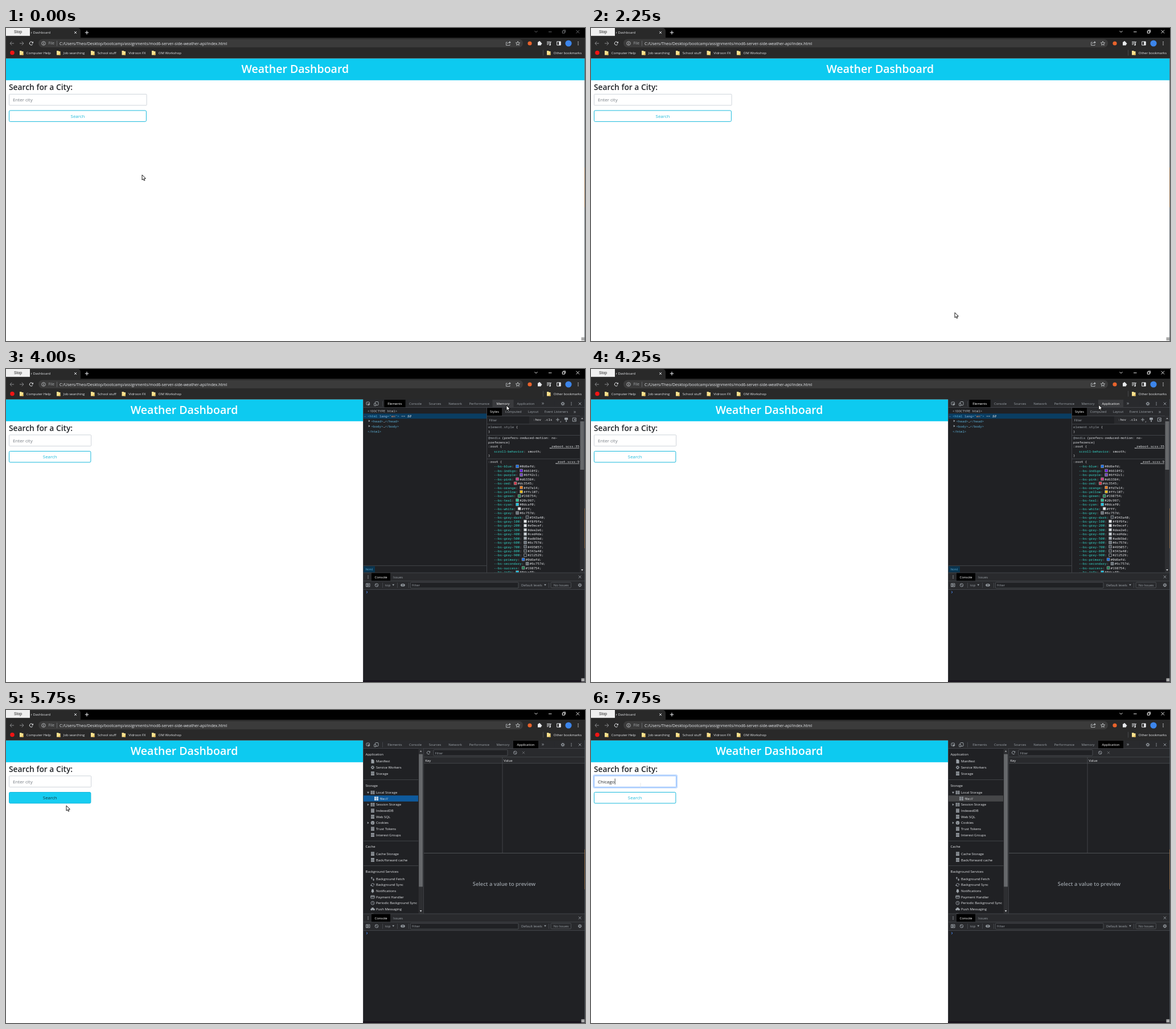
These frames come from a looping animation (1017 px wide and 550 px high, 8 s). An HTML page with a canvas:

```html
<!DOCTYPE html>
<html lang="en">
<head>
<meta charset="utf-8">
<title>Weather Dashboard</title>
<style>
html, body { margin: 0; width: 100%; height: 100%; overflow: hidden; background: #fff; }
canvas { display: block; width: 1017px; height: 550px; }
</style>
</head>
<body>
<canvas id="stage"></canvas>
<script>
const W = 1017, H = 550, LOOP = 8000, TICK = 250;
const SANS = '"Open Sans", "Noto Sans", sans-serif';
const MONO = '"Noto Sans Mono", "DejaVu Sans Mono", monospace';
const CH = 3.48;
const WHITE = '#e8eaed', GRAY = '#9aa0a6', PANEL = '#202124', BAR = '#292a2d', RULE = '#494c50', CYAN = '#0dcaf0';

const canvas = document.getElementById('stage');
const ctx = canvas.getContext('2d');
const dpr = window.devicePixelRatio || 1;
canvas.width = W * dpr;
canvas.height = H * dpr;
ctx.scale(dpr, dpr);

// ---------- drawing helpers ----------
function rect(x, y, w, h, c) {
  ctx.fillStyle = c;
  ctx.fillRect(x, y, w, h);
}
function frame(x, y, w, h, c, r = 0, fill) {
  ctx.beginPath();
  ctx.roundRect(x, y, w, h, r);
  if (fill) { ctx.fillStyle = fill; ctx.fill(); }
  ctx.strokeStyle = c;
  ctx.lineWidth = 1;
  ctx.stroke();
}
function line(c, w, ...p) {
  ctx.beginPath();
  for (let i = 0; i < p.length; i += 2) ctx.lineTo(p[i], p[i + 1]);
  ctx.strokeStyle = c;
  ctx.lineWidth = w;
  ctx.stroke();
}
function poly(c, ...p) {
  ctx.beginPath();
  for (let i = 0; i < p.length; i += 2) ctx.lineTo(p[i], p[i + 1]);
  ctx.closePath();
  ctx.fillStyle = c;
  ctx.fill();
}
function disc(x, y, r, c) {
  ctx.beginPath();
  ctx.arc(x, y, r, 0, 7);
  ctx.fillStyle = c;
  ctx.fill();
}
function arc(x, y, r, c, w = 0.9, a = 0, b = 2 * Math.PI) {
  ctx.beginPath();
  ctx.arc(x, y, r, a, b);
  ctx.strokeStyle = c;
  ctx.lineWidth = w;
  ctx.stroke();
}
// y is the middle of the capitals
function text(s, x, y, size = 6, c = WHITE, align = 'left', weight = 400, face = SANS) {
  ctx.font = `${weight} ${size}px ${face}`;
  ctx.textAlign = align;
  ctx.fillStyle = c;
  ctx.fillText(s, x, y + size * 0.36);
}
function code(x, y, ...parts) {
  for (let i = 0; i < parts.length; i += 2) {
    text(parts[i], x, y, 5.8, parts[i + 1], 'left', 400, MONO);
    x += parts[i].length * CH;
  }
}
function cross(x, y, r, c, w = 0.9) {
  line(c, w, x - r, y - r, x + r, y + r);
  line(c, w, x + r, y - r, x - r, y + r);
}
function dots(x, y, c, gap = 2.4) {
  for (let i = -1; i < 2; i++) disc(x, y + i * gap, 0.75, c);
}
function reload(x, y, r, c) {
  arc(x, y, r, c, 1, 0.5, 5.6);
  poly(c, x + r + 0.5, y - r - 0.5, x + r + 0.5, y - 0.3, x + 0.6, y - 0.3);
}
function gear(x, y, r, c) {
  arc(x, y, r * 0.62, c, 1.3);
  for (let i = 0; i < 8; i++) {
    const a = i * Math.PI / 4, u = Math.cos(a), v = Math.sin(a);
    line(c, 1, x + u * r * 0.7, y + v * r * 0.7, x + u * r * 1.15, y + v * r * 1.15);
  }
}
function noEntry(x, y, c) {
  arc(x, y, 2.8, c);
  line(c, 0.9, x - 2, y - 2, x + 2, y + 2);
}
function triDown(x, y, c, r = 1.8) { poly(c, x - r, y - r * 0.6, x + r, y - r * 0.6, x, y + r); }
function triUp(x, y, c) { poly(c, x - 1.8, y + 1, x + 1.8, y + 1, x, y - 1.4); }
function triRight(x, y, c) { poly(c, x - 1.2, y - 2, x + 1.6, y, x - 1.2, y + 2); }

// ---------- browser chrome ----------
function folder(x) {
  poly('#fbe08d', x, 40, x + 3, 40, x + 4, 41, x + 6.5, 41, x + 6.5, 47.5, x, 47.5);
  rect(x + 4.2, 45.2, 2.3, 2.3, '#e3b94c');
}
function browser(active) {
  rect(0, 0, W, 18, '#000');
  rect(0, 17, W, 36.5, '#292929');
  ctx.beginPath();
  ctx.roundRect(-6, 0, 137, 19, [0, 5, 0, 0]);
  ctx.fillStyle = '#292929';
  ctx.fill();
  text('r Dashboard', 78.3, 8, 6, '#dfe1e4', 'right');
  cross(122, 8, 2, WHITE);
  line(WHITE, 1.1, 138.8, 8, 145.2, 8);
  line(WHITE, 1.1, 142, 4.8, 142, 11.2);
  rect(0, 0, 42, 14, '#f0f0f0');
  rect(0, 13, 42, 1, '#c9c9c9');
  text('Stop', 21, 6.8, 6.8, '#222', 'center', 400, '"Liberation Sans", sans-serif');

  const c = active ? '#fff' : '#77797c';
  line(c, 0.9, 928.5, 5, 931, 7.6, 933.5, 5);
  line(c, 0.9, 953, 6.8, 958.5, 6.8);
  frame(977.3, 5, 4, 4, c);
  line(c, 0.8, 978.7, 3.6, 982.7, 3.6, 982.7, 7.6);
  cross(1004.3, 6.5, 2.8, c);

  for (const [x, d] of [[10.5, -1], [27.5, 1]]) {
    line('#8a8b8d', 1, x - 3.5, 27, x + 3.5, 27);
    line('#8a8b8d', 1, x + d * 0.3, 23.7, x + d * 3.5, 27, x + d * 0.3, 30.3);
  }
  reload(44.3, 27, 3, WHITE);
  ctx.beginPath();
  ctx.roundRect(57, 19.5, 851, 14.5, 7.2);
  ctx.fillStyle = '#3b3b3b';
  ctx.fill();
  arc(66, 27, 3.3, '#c4c7ca', 0.8);
  rect(65.5, 26.4, 1, 2.7, '#c4c7ca');
  rect(65.5, 24.8, 1, 1, '#c4c7ca');
  text('File', 74.5, 27, 6.6, '#a4a7aa');
  rect(89, 22.5, 0.8, 9, '#737578');
  text('C:/Users/Theo/Desktop/bootcamp/assignments/mod6-server-side-weather-api/index.html', 94, 27, 7.03);

  // share, star
  line('#b7babd', 0.9, 880.5, 25, 878.5, 25, 878.5, 30.5, 885, 30.5, 885, 28.5);
  line('#b7babd', 0.9, 880.5, 28.3, 882, 25.7, 885.3, 25.3);
  poly('#b7babd', 884, 23, 886.8, 25.3, 884, 27.6);
  const star = [];
  for (let i = 0; i < 11; i++) {
    const a = i * Math.PI / 5 - Math.PI / 2, r = i % 2 ? 1.7 : 3.8;
    star.push(899 + r * Math.cos(a), 27.2 + r * Math.sin(a));
  }
  line('#d5d8da', 0.8, ...star);
  disc(920, 27, 3.6, '#e8632c');
  rect(934, 24.5, 5.8, 6, WHITE);
  disc(937, 24.3, 1.3, WHITE);
  disc(940, 27.5, 1.3, WHITE);
  for (let i = 0; i < 3; i++) line(WHITE, 1, 950, 24.3 + i * 2.3, i < 2 ? 956 : 953, 24.3 + i * 2.3);
  line(WHITE, 0.9, 958, 24.5, 956.4, 24.5, 956.4, 29.4);
  disc(955.5, 29.6, 1.3, WHITE);
  frame(967.7, 23.9, 6.5, 6.2, WHITE);
  rect(971.2, 24, 3, 6, WHITE);
  disc(988, 27, 5.6, '#3c85ea');
  dots(1005, 27, WHITE);

  disc(11, 43.5, 3.8, '#f01515');
  const marks = [[24, 'Computer Help'], [89, 'Job searching'], [149, 'School stuff'],
    [203.5, 'Vidroon FX'], [256, 'OM Workshop'], [950, 'Other bookmarks']];
  for (const [x, s] of marks) {
    folder(x);
    text(s, x + 11.8, 43.5, 6);
  }
  rect(943, 38.5, 0.8, 10, '#515356');
}

// ---------- web page ----------
function page(w, y, s) {
  rect(0, 53, W, H - 53, '#fff');
  rect(0, 53.4, w, 38.4, CYAN);
  text('Weather Dashboard', w / 2 - 0.4, 72, 19.55, '#fff', 'center', 600);
  text('Search for a City:', 5, 104, 13.8, '#212529', 'left', 600);

  const fw = w > 700 ? 242 : 144.5, bw = fw - 0.6;
  if (s.focus) {
    ctx.beginPath();
    ctx.roundRect(3.3, y - 2.2, fw + 4.3, 24.4, 3);
    ctx.fillStyle = '#c2dbfe';
    ctx.fill();
  }
  frame(5.5, y + 0.3, fw - 0.4, 19.6, s.focus ? '#86b7fe' : '#ced4da', 1, '#fff');
  if (s.typed) text(s.typed, 12, y + 10.3, 8, '#212529');
  else text('Enter city', 12, y + 10.3, 8, '#757c83');
  if (s.caret) {
    ctx.font = `8px ${SANS}`;
    rect(12 + ctx.measureText(s.typed).width + 0.3, y + 5, 0.8, 10.3, '#212529');
  }
  frame(5.5, y + 29, bw - 0.5, 19.4, '#17b9dc', 2, s.hover ? '#17cdf1' : '#fff');
  text('Search', 5.3 + bw / 2, y + 39, 7.95, s.hover ? '#123840' : '#1fbbdb', 'center');
}

// ---------- developer tools ----------
function tabs(open, full) {
  rect(627, 53, 390, 14.5, BAR);
  rect(627, 67, 390, 0.8, RULE);
  frame(633, 58, 5.5, 5, GRAY, 1);
  poly(GRAY, 635.2, 60, 640, 62, 638, 62.8, 637, 65);
  frame(648.5, 57.5, 5.5, 6, GRAY, 1);
  frame(646.7, 60.2, 3, 4.4, GRAY, 0.5, BAR);
  rect(661, 56.5, 0.8, 9, RULE);
  const names = [['Elements', 683], ['Console', 719], ['Sources', 753.5], ['Network', 789],
    ['Performance', 831.3], ['Memory', 873], ['Application', 913]];
  if (!full) names.push(['Security', 953]);
  for (const [s, x] of names) {
    const on = s === open.tab, over = s === open.over;
    const hw = s === 'Application' ? 22 : 18.6;
    if (on || over) rect(x - hw, 54, hw * 2, 13.2, on ? '#000' : '#393a3d');
    text(s, x, 61, 5.9, on || over ? '#fff' : GRAY, 'center');
  }
  text('»', full ? 943 : 983, 60.2, 9, GRAY, 'center');
  if (full) {
    rect(963, 56.5, 0.8, 9, BAR);
    gear(978, 61, 3, GRAY);
    dots(993, 61, GRAY, 2.3);
    cross(1008, 61, 2.3, GRAY);
  }
}
function drawer(full) {
  rect(627, 357.7, 390, 15, BAR);
  rect(627, 357.7, 390, 0.8, RULE);
  rect(627, 372.3, 390, 0.8, RULE);
  rect(642, 358.5, 33, 13.6, '#000');
  dots(636, 365.5, GRAY, 2.3);
  text('Console', 658.5, 365.5, 5.9, '#fff', 'center');
  text('Issues', 688.5, 365.5, 5.9, GRAY, 'center');
  cross(1008, 365.3, 2.3, GRAY);

  rect(627, 373, 390, 14.5, BAR);
  rect(627, 387, 390, 0.8, RULE);
  frame(632.5, 377, 6.5, 5.5, GRAY);
  rect(634, 377, 0.8, 5.5, GRAY);
  triRight(636.6, 379.8, GRAY);
  noEntry(651, 379.8, GRAY);
  rect(661, 375.5, 0.8, 9, RULE);
  const ex = full ? 697 : 687;
  if (full) {
    text('top', 666, 380, 5.9, GRAY);
    triDown(680.3, 379.3, GRAY);
    triDown(947, 379.3, GRAY);
  }
  rect(ex - 9.8, 375.5, 0.8, 9, RULE);
  ctx.beginPath();
  ctx.ellipse(ex, 379.7, 3.8, 2.5, 0, 0, 7);
  ctx.fillStyle = GRAY;
  ctx.fill();
  disc(ex, 379.7, 1.6, BAR);
  disc(ex, 379.7, 0.9, GRAY);
  rect(ex + 10, 375.5, 0.8, 9, RULE);
  frame(ex + 13.5, 374.8, 900 - ex - 13.5, 10.2, RULE, 1, PANEL);
  text('Filter', ex + 16, 380.2, 6, GRAY);
  text('Default levels', 905, 380, 5.9, GRAY);
  rect(953, 375.5, 0.8, 9, RULE);
  frame(957, 374.8, 35.5, 9.8, RULE, 1.5);
  text('No Issues', 975, 380, 5.9, GRAY, 'center');
  gear(1008, 379.8, 3, GRAY);
  if (full) line('#4a8df6', 1, 633, 390.4, 635, 392.2, 633, 394);
  else rect(639.6, 388.8, 0.8, 7.4, WHITE);
}
function scrollbar(x, y0, y1, len) {
  rect(x, y0 - 5, 8, y1 - y0 + 10, '#2d2e31');
  rect(x + 0.6, y0 + 5, 6.8, len, '#66686b');
  triUp(x + 4, y0, '#a4a6a9');
  triDown(x + 4, y1, '#d7d9dc');
}

const VARS = ('blue 0d6efd indigo 6610f2 purple 6f42c1 pink d63384 red dc3545 orange fd7e14 yellow ffc107 ' +
  'green 198754 teal 20c997 cyan 0dcaf0 white fff gray 6c757d gray-dark 343a40 gray-100 f8f9fa gray-200 e9ecef ' +
  'gray-300 dee2e6 gray-400 ced4da gray-500 adb5bd gray-600 6c757d gray-700 495057 gray-800 343a40 gray-900 212529 ' +
  'primary 0d6efd secondary 6c757d success 198754 info 0dcaf0').split(' ');

function elements() {
  const tag = '#5db0d7', prop = '#35d4c7', txt = '#e3e5e8';
  code(635, 74, '<!DOCTYPE html>', '#bdc1c6');
  rect(628, 78.3, 216, 9, '#0a3d62');
  code(628.5, 81.5, '…', GRAY);
  code(635, 83, '<html ', tag, 'lang', '#9bbbdc', '="', tag, 'en', '#f29766', '">', tag, ' == ', '#b5bbc2');
  text('$0', 635 + 20 * CH, 83, 5.8, '#d3d7db', 'left', 'italic 400', MONO);
  ['head', 'body'].forEach((n, i) => {
    const y = 92.2 + i * 9;
    triRight(638, y - 1, GRAY);
    code(641.5, y, `<${n}>`, tag, '…', txt, `</${n}>`, tag);
  });
  code(635, 110.4, '</html>', tag);
  rect(628, 345.3, 216, 0.8, RULE);
  rect(628, 346.5, 20, 11, '#0a3550');
  text('html', 631.5, 352, 5.9, tag);

  rect(844, 68, 0.8, 290, RULE);
  rect(845, 68, 172, 14.3, BAR);
  rect(845, 68.3, 26, 13.8, '#000');
  const tabNames = [['Styles', 858], ['Computed', 891], ['Layout', 926], ['Event Listeners', 966.5]];
  tabNames.forEach(([s, x], i) => text(s, x, 75.2, 5.9, i ? GRAY : '#fff', 'center'));
  text('»', 999, 74.5, 9, GRAY, 'center');
  rect(845, 82, 172, 0.8, RULE);
  text('Filter', 848.5, 89.5, 6, GRAY);
  rect(919, 83, 97, 13.5, BAR);
  code(926, 89.3, ':hov', WHITE);
  code(945.5, 89.3, '.cls', WHITE);
  line(GRAY, 1, 966, 89, 972, 89);
  line(GRAY, 1, 969, 86, 969, 92);
  poly(GRAY, 975, 91.5, 975, 93.5, 973, 93.5);
  frame(981.5, 86, 5, 3, GRAY, 0, GRAY);
  rect(983.3, 90, 1.6, 3, GRAY);
  frame(995.3, 86, 6, 6, GRAY);
  poly(GRAY, 1000, 87.3, 1000, 91, 997.5, 89.1);
  rect(845, 96.5, 163, 0.8, RULE);

  ctx.save();
  ctx.beginPath();
  ctx.rect(845, 97, 163, 260.5);
  ctx.clip();
  code(847, 101.5, 'element.style', GRAY, ' {', txt);
  code(847, 110, '}', txt);
  rect(845, 116, 163, 0.8, RULE);
  code(847, 121, '@media ', GRAY, '(prefers-reduced-motion: no-', txt);
  code(847, 128.5, 'preference)', txt);
  code(847, 136, ':root {', txt);
  code(857, 144.5, 'scroll-behavior', prop, ': smooth;', txt);
  code(847, 152, '}', txt);
  rect(845, 157.6, 163, 0.8, RULE);
  code(847, 163, ':root {', txt);
  for (const [s, y] of [['_reboot.scss:35', 136], ['_root.scss:9', 163]]) {
    const x = 1007 - s.length * CH;
    code(x, y, s, txt);
    rect(x, y + 2.9, s.length * CH, 0.6, txt);
  }
  for (let i = 0; i < VARS.length; i += 2) {
    const y = 171.3 + i / 2 * 7.43, name = `--bs-${VARS[i]}`, x = 857 + (name.length + 2) * CH;
    code(857, y, name, prop, ':', txt);
    frame(x + 0.5, y - 2.6, 4.8, 4.8, '#85888c', 0, '#' + VARS[i + 1]);
    code(x + 7, y, `#${VARS[i + 1]};`, txt);
  }
  ctx.restore();
  scrollbar(1008, 87, 353, 85);
}

const ICONS = {
  file: (x, y) => poly(GRAY, x - 2.5, y - 3.5, x + 0.8, y - 3.5, x + 2.7, y - 1.6, x + 2.7, y + 3.5, x - 2.5, y + 3.5),
  gear: (x, y) => gear(x, y, 2.9, GRAY),
  db: (x, y) => { for (let i = -1; i < 2; i++) rect(x - 3, y + i * 2.4 - 1, 6, 1.9, GRAY); },
  grid: (x, y, c) => {
    for (let i = 0; i < 6; i++) rect(x - 3.5 + (i % 2) * 3.8, y - 3.1 + (i >> 1) * 2.2, 3.2, 1.7, c || GRAY);
  },
  cookie: (x, y) => {
    disc(x, y, 3.2, GRAY);
    for (const [u, v] of [[-1, -1], [1.2, 0], [-0.6, 1.4]]) disc(x + u, y + v, 0.6, PANEL);
  },
  swap: (x, y) => {
    line(GRAY, 0.9, x - 1.6, y + 1, x - 1.6, y - 3);
    line(GRAY, 0.9, x + 1.6, y - 1, x + 1.6, y + 3);
    triUp(x - 1.6, y - 2, GRAY);
    triDown(x + 1.6, y + 2, GRAY);
  },
  sync: (x, y) => {
    arc(x, y, 2.5, GRAY, 0.9, 0.4, 2.9);
    arc(x, y, 2.5, GRAY, 0.9, 3.5, 6);
    triDown(x + 2.4, y - 0.8, GRAY, 1.2);
    triUp(x - 2.4, y + 0.5, GRAY);
  },
  bell: (x, y) => {
    poly(GRAY, x - 2, y - 2, x, y - 3.4, x + 2, y - 2, x + 2.1, y + 1, x + 3, y + 2.2, x - 3, y + 2.2, x - 2.1, y + 1);
    disc(x, y + 2.8, 0.9, GRAY);
  },
  card: (x, y) => { frame(x - 3.2, y - 2.4, 6.4, 4.8, GRAY, 0.6); rect(x - 3, y - 1.3, 6, 1.3, GRAY); },
  clock: (x, y) => { arc(x, y, 3, GRAY); line(GRAY, 0.8, x, y - 1.8, x, y + 0.2, x + 1.4, y + 1); },
  cloud: (x, y) => { disc(x - 2, y + 0.7, 1.8, GRAY); disc(x, y - 0.6, 2.3, GRAY); disc(x + 2.2, y + 0.7, 1.8, GRAY); }
};
// title, its y, first item y, items as "icon:label"
const GROUPS = [
  ['Application', 78, 90.3, 'file:Manifest,gear:Service Workers,db:Storage'],
  ['Storage', 132.5, 145, 'grid:Local Storage,grid:file,grid:Session Storage,db:IndexedDB,db:Web SQL,' +
    'cookie:Cookies,db:Trust Tokens,db:Interest Groups'],
  ['Cache', 240, 252.8, 'db:Cache Storage,db:Back/forward cache'],
  ['Background Services', 284, 296.6, 'swap:Background Fetch,sync:Background Sync,bell:Notifications,' +
    'card:Payment Handler,clock:Periodic Background Sync,cloud:Push Messaging,file:']
];
function application(s) {
  ctx.save();
  ctx.beginPath();
  ctx.rect(628, 68, 96.5, 289.5);
  ctx.clip();
  rect(628, 150.2, 96, 10.6, s.picked ? '#0e5a9c' : '#454648');
  for (const [title, ty, y0, items] of GROUPS) {
    text(title, 631.5, ty, 6);
    items.split(',').forEach((item, i) => {
      const [icon, label] = item.split(':'), y = y0 + i * 10.65, child = label === 'file';
      ICONS[icon](child ? 650.5 : 644, y, child && s.picked ? '#fff' : GRAY);
      text(child ? 'file://' : label, child ? 656.5 : 650, y, 6);
      if (/^(Session|Cookies)/.test(label) || (label === 'Manifest' && s.arrow)) triRight(636, y, GRAY);
      if (label === 'Local Storage') triDown(636, y, GRAY, 2);
    });
  }
  for (const y of [122, 229.7, 273.3]) rect(628, y, 97, 0.8, RULE);
  ctx.restore();
  scrollbar(724.6, 72.5, 353, 233);
  rect(733, 68, 0.8, 290, RULE);

  rect(734, 68, 283, 14.5, BAR);
  reload(742, 75, 2.6, GRAY);
  frame(751, 69.8, 130, 10.4, RULE, 1, PANEL);
  text('Filter', 753.5, 75.5, 6, GRAY);
  noEntry(894.3, 75, GRAY);
  cross(909, 75, 2.2, '#65686c');
  rect(734, 82.5, 283, 11, BAR);
  rect(734, 82.3, 283, 0.8, RULE);
  rect(734, 93.3, 283, 0.8, RULE);
  text('Key', 736.3, 88.5, 6);
  text('Value', 874.3, 88.5, 6);
  rect(871.6, 83, 0.8, 168, RULE);
  rect(734, 251, 283, 0.8, '#5a5d61');
  text('Select a value to preview', 875, 306, 9.3, GRAY, 'center', 600);
}
function devtools(s) {
  rect(627, 53, 390, H - 53, PANEL);
  tabs(s, s.full);
  if (s.tab === 'Application') application(s);
  else if (s.full) elements();
  drawer(s.full);
  rect(627, 53, 0.8, H - 53, RULE);
  rect(627, 547.3, 390, 2.7, '#17121c');
}

// ---------- pointer ----------
const PATH = [[0, 239, 258], [750, 239, 258], [2000, 639, 500], [2750, 639, 500], [3250, 722, 310],
  [3750, 860, 92], [4000, 879, 64], [4500, 904.5, 62], [4750, 904.5, 62], [5250, 676, 153],
  [5750, 106, 168], [6000, 90, 130], [6250, 87, 132], [8000, 87, 132]];
function pointer(t) {
  let i = 1;
  while (t > PATH[i][0]) i++;
  const [t0, x0, y0] = PATH[i - 1], [t1, x1, y1] = PATH[i];
  const u = (t - t0) / (t1 - t0), k = u * u * (3 - 2 * u);
  return [x0 + (x1 - x0) * k, y0 + (y1 - y0) * k];
}
function drawPointer(t) {
  const [x, y] = pointer(t);
  if (t >= 6000) {
    line('#dfe3e6', 0.8, x, y - 4, x, y + 4);
    return;
  }
  ctx.save();
  ctx.translate(x, y);
  const p = [0, 0, 0, 9, 2, 7.2, 3.4, 10.2, 4.9, 9.5, 3.6, 6.7, 6.3, 6.4];
  poly('#fff', ...p);
  ctx.lineJoin = 'round';
  line('#000', 0.9, ...p, 0, 0);
  ctx.restore();
}

// ---------- timeline ----------
function draw(t) {
  const typed = 'Chicago'.slice(0, t < 7250 ? 0 : 3 + (t - 7250) / TICK * 2);
  const focus = t >= 6250;
  const s = {
    tab: t < 4500 ? 'Elements' : 'Application',
    over: t >= 4000 && t < 4250 ? 'Memory' : t === 4250 ? 'Application' : '',
    full: t >= 2750,
    picked: t >= 5250 && t < 6250,
    arrow: t < 5250,
    hover: t === 5750,
    focus, typed,
    caret: focus && (typed !== '' || (t - 6250) % 1000 < 500)
  };
  const tools = t >= 2500;
  page(tools ? 627 : 1016.3, tools ? 115.5 : 116, s);
  if (tools) devtools(s);
  browser(t >= 2000);
  rect(1016.2, 53, 0.8, 497, '#4b545c');
  rect(1016.2, 245, 0.8, 70, '#a0764a');
  rect(1010.5, 543.5, 5.5, 5.5, '#a9a9a9');
  drawPointer(t);
}

let last = -1;
function tick(now) {
  const t = Math.floor(now % LOOP / TICK) * TICK;
  if (t !== last) draw(last = t);
  requestAnimationFrame(tick);
}
draw(0);
requestAnimationFrame(tick);
</script>
</body>
</html>
```
